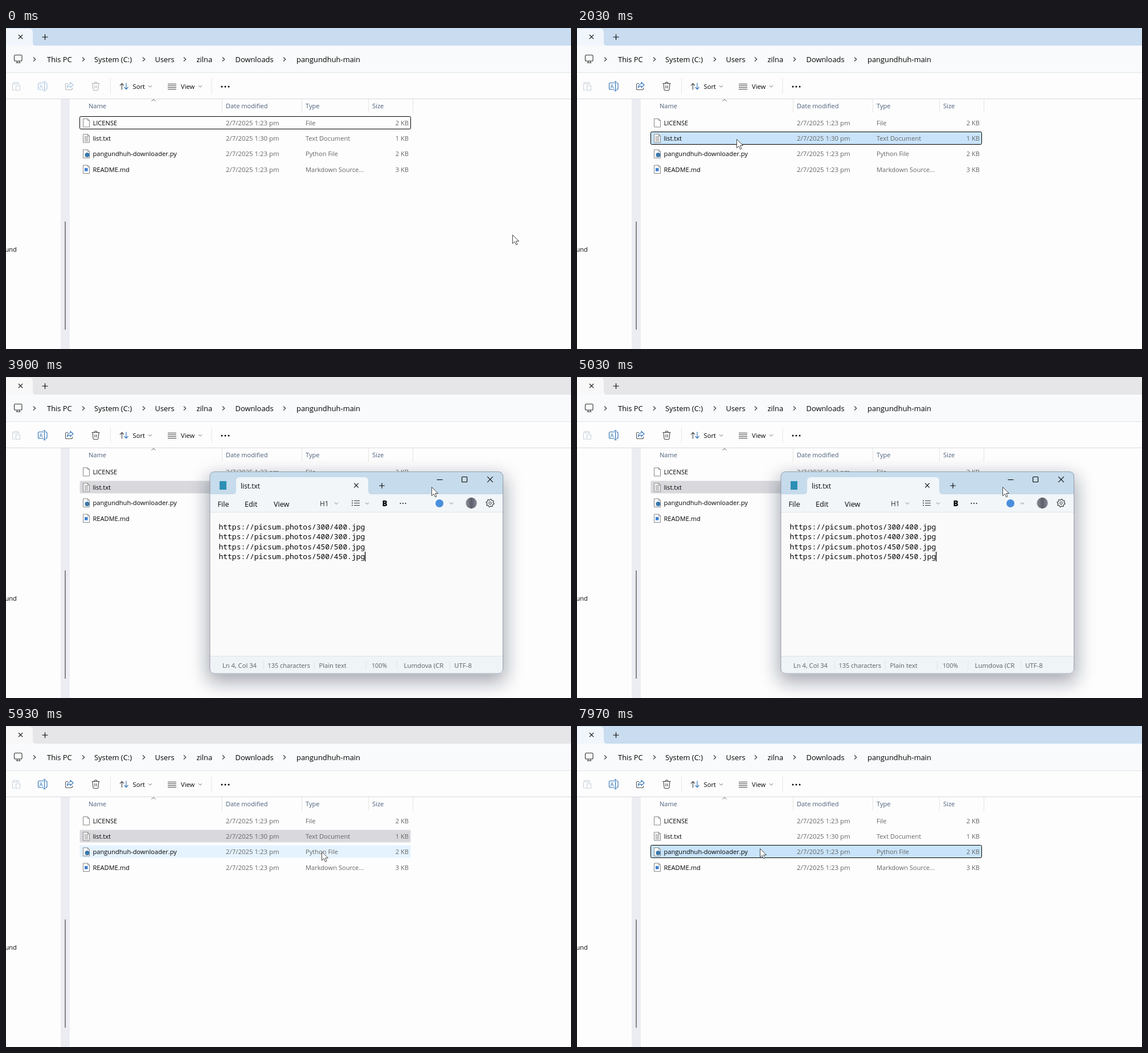
Animation, 992 px wide and 564 px high, one loop 8000 ms. Source, as an HTML page:

```html
<!DOCTYPE html>
<html lang="en">
<head>
<meta charset="utf-8">
<title>Opening a list file</title>
<style>
html, body { margin: 0; width: 100%; height: 100%; overflow: hidden; background: #fdfdfd; }
svg { display: block; width: 100vw; height: 100vh; }
text { font-family: "Open Sans", "Noto Sans", sans-serif; white-space: pre; }
.mono { font-family: "Noto Sans Mono", "DejaVu Sans Mono", monospace; }
</style>
</head>
<body>
<svg id="stage" viewBox="0 0 992 564"></svg>
<script>
const LOOP = 8000;
const INK = '#050505', BLUE = '#2a6fb5', GREY = '#666';

const text = (x, y, s, size = 11.1, fill = INK, extra = '') =>
  `<text x="${x}" y="${y}" font-size="${size}" fill="${fill}" ${extra}>${s}</text>`;
const rect = (x, y, w, h, fill, extra = '') =>
  `<rect x="${x}" y="${y}" width="${w}" height="${h}" fill="${fill}" ${extra}/>`;
const line = (d, stroke = INK, width = 1.1, extra = '') =>
  `<path d="${d}" fill="none" stroke="${stroke}" stroke-width="${width}" ${extra}/>`;
const cross = (x, y, r) => line(`M${x - r} ${y - r}l${2 * r} ${2 * r}m0 ${-2 * r}l${-2 * r} ${2 * r}`);
const plus = (x, y, r) => line(`M${x - r} ${y}h${2 * r}M${x} ${y - r}v${2 * r}`);
const right = (x, y) => line(`M${x - 2} ${y - 3.5}l3.8 3.5l-3.8 3.5`, '#333');
const down = (x, y, r = 3) => line(`M${x - r} ${y - r / 2}l${r} ${r}l${r} ${-r}`, '#777', 1);
const dots = (x, y, gap, r) =>
  [-1, 0, 1].map(i => `<circle cx="${x + i * gap}" cy="${y}" r="${r}" fill="${INK}"/>`).join('');

const files = [
  ['LICENSE', '1:23', 'File', 2],
  ['list.txt', '1:30', 'Text Document', 1],
  ['pangundhuh-downloader.py', '1:23', 'Python File', 2],
  ['README.md', '1:23', 'Markdown Source...', 3]
];
const rowTop = i => 155 + 27 * i;

function page(i) {
  const y = 159.5 + 27.2 * i;
  const marks = [
    '',
    [4, 6, 8, 10, 12].map(d => line(`M137.5 ${y + d}h7`, '#8a8a8a', 0.9)).join(''),
    `<circle cx="142.5" cy="${y + 9}" r="4" fill="#3b79ad"/>`,
    rect(138, y + 5, 5.5, 5.5, '#3f7fd0')
  ];
  return line(`M135.5 ${y}h8l3 3v11.5h-11z`, '#858585', 1, 'style="fill:#fff"')
    + line(`M143.5 ${y}v3h3`, '#858585', 1) + marks[i];
}

function fileRow([name, time, type, kb], i) {
  const y = 171 + 27.2 * i;
  return rect(129.5, rowTop(i) + 0.5, 581, 22, 'none', `id="row${i}" rx="2"`) + page(i)
    + text(152.5, y, name) + text(386, y, `2/7/2025 ${time} pm`, 11.4, GREY)
    + text(526, y, type, 11.1, GREY)
    + text(707, y, kb + ' KB', 11.1, GREY, 'text-anchor="end"');
}

function toolbar() {
  const paste = line('M14 97h-2.5v12h5M20 97h2.5v3M14 95.500h6v3h-6z', '#7f97ad')
    + line('M17.500 101.500h7v8h-7z', '#7f97ad');
  const rename = line('M66 96.500h-7.500q-2 0-2 2v7.500q0 2 2 2h7.500M69 96.500h1q2 0 2 2v7.500q0 2-2 2h-1M67.500 94v16.500m-2-16.500h4m-4 16.500h4', BLUE)
    + text(58.5, 106, 'A', 9.5, BLUE);
  const share = line('M109 97.500h-2.500q-2 0-2 2v7q0 2 2 2h8q2 0 2-2v-1.500', '#555')
    + line('M113 95.500l5 4.500l-5 4.500v-2.500q-4 0-5.500 3q0-6 5.500-7z', BLUE);
  const bin = line('M150.500 97.500h14M155 97.500q0-2.500 2.500-2.500t2.500 2.500M152 97.500l1 10.500q.2 1.500 1.500 1.500h6q1.300 0 1.500-1.500l1-10.500M156 101v5m3-5v5', '#444');
  return `<g opacity=".4">${paste}</g><g id="tools">${rename}${share}${bin}</g>`
    + line('M183.500 89v27M361 89v27', '#e6e6e6', 1)
    + line('M203.500 108.500v-11l-3.500 3.500m3.500-3.500l3.500 3.500', '#444')
    + line('M211 96.500v11l-3.500-3.500m3.500 3.500l3.500-3.500', BLUE)
    + text(222.5, 107, 'Sort', 11.2) + down(253, 102.5)
    + line('M284 98.500h15m-15 3h15m-15 3h15m-15 3h15', '#444', 1)
    + text(307, 107, 'View', 11.2) + down(341, 102.5) + dots(385, 103, 6, 1.5);
}

function explorer() {
  const crumbs = [[72, 'This PC'], [155, 'System (C:)'], [261.5, 'Users'],
    [334.5, 'zilna'], [402.5, 'Downloads'], [510, 'pangundhuh-main']];
  const heads = [[145, 'Name'], [386, 'Date modified'], [526, 'Type'], [643, 'Size']];
  return rect(0, 0, 992, 564, '#fdfdfd')
    + rect(0, 0, 992, 31, '#c9dcf0', 'id="title"')
    + `<path id="tab" d="M0 1h40q7 0 7 7v17q0 6 6 6H0z"/>`
    + cross(25.5, 15.5, 3.7) + plus(68.5, 16, 5)
    + rect(0, 31, 992, 48, '#f9fafb') + rect(0, 78, 992, 1, '#dfe5ec')
    + rect(0, 124, 992, 1, '#d5d9df')
    + line('M16.500 47.500h9.500q2 0 2 2v6.500q0 2-2 2h-9.500q-2 0-2-2v-6.500q0-2 2-2zM19.500 58v2.500m4-2.500v2.500M17.500 61h8', '#333')
    + [50, 136, 242, 314, 382, 489].map(x => right(x, 55)).join('')
    + crumbs.map(([x, s]) => text(x, 59.5, s, 12.9)).join('')
    + toolbar()
    + rect(96, 125, 16, 439, '#ececf3') + rect(103, 340, 2, 190, '#858585')
    + text(-1.5, 393, 'und')
    + heads.map(([x, s]) => text(x, 141, s, 11.1, '#4c607a')).join('')
    + line('M379.500 125v24M519.500 125v24M636.500 125v24M714.500 125v24', '#e4e4e0', 1)
    + line('M255.500 128.500l3.500-3l3.500 3', '#666', 1)
    + files.map(fileRow).join('');
}

function gear(x, y) {
  let d = '';
  for (let i = 0; i < 32; i++) {
    const a = (i + 0.5) * Math.PI / 16, r = i % 4 < 2 ? 7 : 5.4;
    d += `${i ? 'L' : 'M'}${(x + r * Math.cos(a)).toFixed(1)} ${(y + r * Math.sin(a)).toFixed(1)}`;
  }
  return line(d + 'z', '#333', 1.1) + `<circle cx="${x}" cy="${y}" r="2.200" fill="none" stroke="#333"/>`;
}

function notepad() {
  const urls = ['300/400', '400/300', '450/500', '500/450'];
  const status = [[380, 'Ln 4, Col 34'], [459.5, '135 characters', 10.9], [549.5, 'Plain text'],
    [642, '100%', 10.7], [698.5, 'Lumdova (CR', 11.4], [787, 'UTF-8', 11.4]];
  const extras = text(551, 226.5, 'H1', 12, '#333') + down(580, 222)
    + line('M611 217.500h10m-10 4h10m-10 4h10', '#333')
    + line('M607 217.500h2m-2 4h2m-2 4h2', '#333', 1.5)
    + down(634, 222) + text(660.5, 227, 'B', 13.5, INK, 'font-weight="800"') + dots(697, 222, 4.5, 1)
    + '<circle cx="761" cy="222" r="7" fill="#4a8fdc"/>' + down(782, 222)
    + '<circle cx="817" cy="221.500" r="9.700" fill="url(#face)"/>';
  return rect(354, 165, 523, 361, '#101830', 'rx="10" opacity=".36" filter="url(#soft)"')
    + `<g clip-path="url(#frame)">`
    + rect(358, 166, 515, 356, '#fafafa') + rect(358, 166, 515, 40, '#c6dbeb')
    + rect(358, 206, 515, 32, '#f2f6f9') + rect(358, 490, 515, 32, '#eff4f7')
    + rect(358, 237, 515, 1, '#dde3ea') + rect(358, 490, 515, 1, '#dde3ea')
    + '<path d="M398 206q6 0 6-6v-17q0-7 7-7h218q7 0 7 7v17q0 6 6 6z" fill="#f2f6f9"/>'
    + rect(827, 166, 46, 29, '#c42b1c', 'id="hot"') + '</g>'
    + rect(358, 166.5, 514.5, 354.5, 'none', 'rx="8" stroke="#7f8a98" stroke-opacity=".75"')
    + rect(375, 183, 12, 15, '#2c8fb5')
    + text(412, 195.5, 'list.txt', 12) + cross(615, 190.5, 3.8) + plus(660, 191, 4.7)
    + line('M756.500 180.500h10') + rect(800.5, 175.5, 9, 9, 'none', `rx="1" stroke="${INK}" stroke-width="1.1"`)
    + cross(850, 180, 4.8)
    + [[371.5, 'File'], [419, 'Edit'], [470, 'View']].map(([x, s]) => text(x, 227.5, s, 12.7)).join('')
    + `<g id="extras">${extras}</g>` + gear(850, 221.5)
    + urls.map((u, i) => text(373.5, 268 + 17.4 * i, `https://picsum.photos/${u}.jpg`, 12.98, INK, 'class="mono"')).join('')
    + rect(630, 307, 1.2, 17, '#000', 'id="caret"')
    + status.map(([x, s, size]) => text(x, 510.5, s, size || 11.2, '#5c5f63')).join('')
    + line('M452.500 499v15M541.500 499v15M632.500 499v15M686.500 499v15M779.500 499v15', '#e0e5eb', 1);
}

const stage = document.getElementById('stage');
stage.innerHTML = `<defs>
  <filter id="soft" x="-20%" y="-20%" width="140%" height="145%"><feOffset dy="10"/><feGaussianBlur stdDeviation="16"/></filter>
  <clipPath id="frame"><rect x="358" y="166" width="515" height="355.500" rx="8"/></clipPath>
  <linearGradient id="face"><stop offset="0" stop-color="#8f8f96"/><stop offset=".5" stop-color="#5c5e6a"/><stop offset="1" stop-color="#888a98"/></linearGradient>
</defs>${explorer()}<g id="note">${notepad()}</g>
<path id="cursor" d="M.5 .5v15.300l3.600-3.400l2.500 5.600l2.400-1.100l-2.400-5.400h4.900z" fill="#fff" stroke="#333" stroke-width=".9"/>`;

const el = {};
stage.querySelectorAll('[id]').forEach(n => { el[n.id] = n; });
const set = (id, attrs) => { for (const k in attrs) el[id].setAttribute(k, attrs[k]); };
const show = (id, on) => set(id, { visibility: on ? 'inherit' : 'hidden' });

const clamp = v => Math.min(1, Math.max(0, v));
const ramp = (t, a, b) => clamp((t - a) / (b - a));
const ease = k => k * k * (3 - 2 * k);
const mix = (a, b, k) => `rgb(${a.map((v, i) => Math.round(v + (b[i] - v) * k))})`;

// Pointer stops: time, x, y
const path = [
  [650, 889, 363], [830, 296, 226], [970, 296, 226], [1130, 284, 174], [1330, 280, 195],
  [2200, 280, 195], [2800, 526, 203], [3500, 526, 203], [3880, 747, 193], [5150, 747, 193],
  [5450, 839, 185], [5675, 839, 185], [5770, 620, 222], [6300, 321, 215]
];

function pointer(t) {
  const n = path.findIndex(p => p[0] > t);
  if (n === 0) return path[0].slice(1);
  if (n < 0) return path[path.length - 1].slice(1);
  const a = path[n - 1], b = path[n], k = ease(ramp(t, a[0], b[0]));
  return [a[1] + (b[1] - a[1]) * k, a[2] + (b[2] - a[2]) * k];
}

function rowStyle(i, t, hover) {
  const picked = t < 1630 ? -1 : t < 6800 ? 1 : 2;
  const focused = t < 3000 || t >= 6800;
  const outlined = focused && (i === picked || (picked < 0 && i === 0));
  let fill = i === hover ? '#e5f3ff' : 'none';
  if (i === picked) fill = focused ? '#c9e4fa' : '#d9d9dd';
  return { fill, stroke: outlined ? '#000' : 'none' };
}

function draw(t) {
  const [x, y] = pointer(t);
  set('cursor', { transform: `translate(${x.toFixed(1)} ${y.toFixed(1)})` });

  const inList = x > 129 && x < 711 && ((t > 670 && t < 2400) || t > 5770);
  const hover = inList ? Math.floor((y - 153) / 27) : -1;
  files.forEach((_, i) => set('row' + i, rowStyle(i, t, hover)));

  const idle = ramp(t, 2420, 2500) - ramp(t, 6800, 7000);
  set('title', { fill: mix([201, 220, 240], [230, 230, 232], idle) });
  set('tab', { fill: mix([241, 246, 252], [248, 248, 249], idle) });
  set('tools', { opacity: t < 1660 ? 0.4 : 1 });

  const open = 1 - (1 - ramp(t, 2440, 2620)) ** 3, shut = ramp(t, 5570, 5770);
  const scale = (0.92 + 0.08 * open) * (1 - 0.072 * shut);
  show('note', open > 0 && shut < 1);
  set('note', {
    opacity: open * clamp(1 - 1.15 * shut),
    transform: `translate(614 343) scale(${scale.toFixed(4)}) translate(-614 -343)`
  });
  show('extras', t >= 3000);
  show('hot', x > 827 && t < 5570);
  show('caret', shut === 0 && (t - 2600 + 1060) % 1060 < 530);
}

const start = performance.now();
function tick(now) {
  draw(Math.max(0, now - start) % LOOP);
  requestAnimationFrame(tick);
}
draw(0);
requestAnimationFrame(tick);
</script>
</body>
</html>
```
